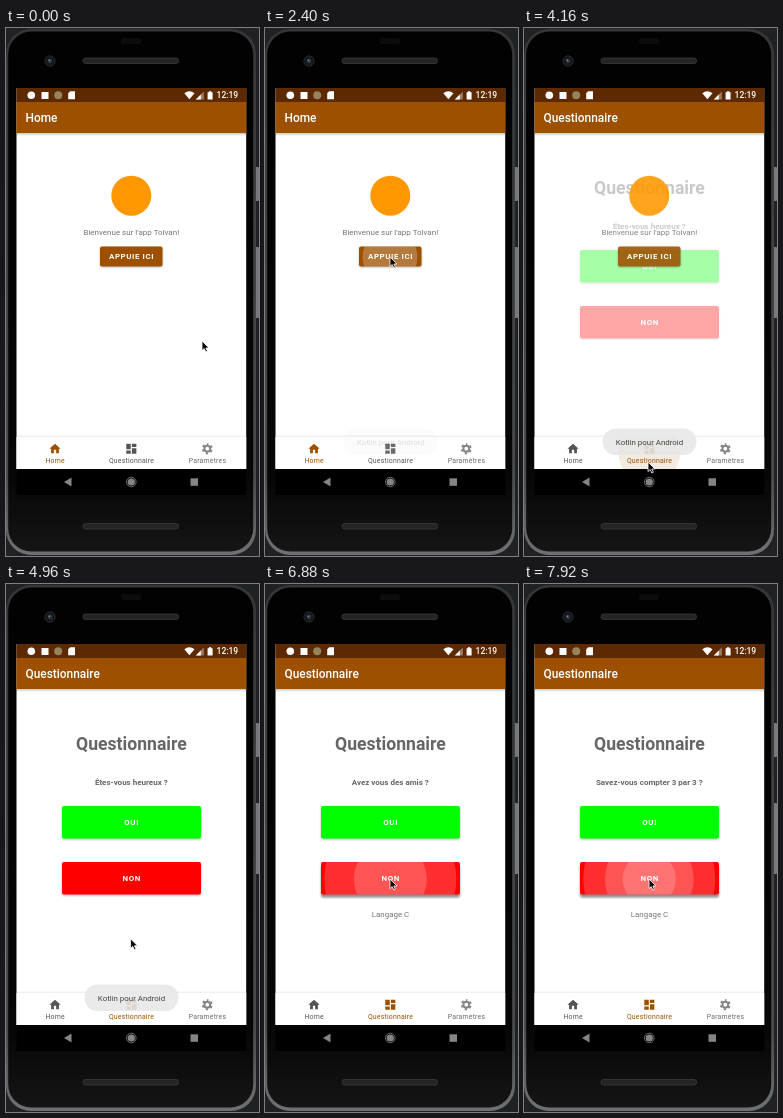
An HTML page that plays this animation: 253 by 528 pixels, repeating every 8000 ms.

```html
<!DOCTYPE html>
<html lang="fr">
<head>
<meta charset="utf-8">
<title>Application mobile</title>
<style>
html, body { margin: 0; width: 100%; height: 100%; overflow: hidden; background: #202124; }
svg { display: block; width: 100vw; height: 100vh; }
text { font-family: Roboto, "Noto Sans", sans-serif; font-size: 7.9px; fill: #757575; }
.mid { text-anchor: middle; }
.bar { font-size: 11.9px; font-weight: 500; fill: #fff; }
.btn { font-weight: 700; letter-spacing: .6px; fill: #fff; text-anchor: middle; }
.tab { font-size: 6.9px; letter-spacing: .2px; text-anchor: middle; fill: inherit; }
.bold { font-size: 8px; font-weight: 700; fill: #666; text-anchor: middle; }
</style>
</head>
<body>
<svg viewBox="0 0 253 528" preserveAspectRatio="none">
  <defs>
    <filter id="soft" x="-20%" y="-50%" width="140%" height="220%"><feGaussianBlur stdDeviation="1.1"/></filter>
    <clipPath id="startClip"><rect x="94" y="218.5" width="62.5" height="20" rx="2"/></clipPath>
    <clipPath id="noClip"><rect x="56" y="278" width="139" height="32.5" rx="2"/></clipPath>
    <clipPath id="tabClip"><rect x="10.5" y="409" width="229.7" height="32"/></clipPath>
    <linearGradient id="drop" x2="0" y2="1">
      <stop stop-opacity=".22"/><stop offset="1" stop-opacity="0"/>
    </linearGradient>
    <linearGradient id="rim" x2="0" y2="1">
      <stop stop-color="#353638"/><stop offset=".85" stop-color="#4a4b4d"/><stop offset="1" stop-color="#707173"/>
    </linearGradient>
    <linearGradient id="glass" x2="0" y2="1">
      <stop stop-color="#020202"/><stop offset=".85" stop-color="#060606"/><stop offset="1" stop-color="#151515"/>
    </linearGradient>
  </defs>

  <!-- Phone body -->
  <rect width="253" height="528" fill="#202124"/>
  <g fill="#77797b">
    <rect x="248" y="139" width="5" height="34" rx="1"/>
    <rect x="248" y="219" width="5" height="71" rx="1"/>
  </g>
  <rect y="1" width="250" height="526" rx="25" fill="url(#rim)"/>
  <rect x="2.2" y="3.5" width="245" height="520" rx="23" fill="url(#glass)"/>
  <rect x="115" y="10" width="20" height="6" rx="2" fill="#0c0c0d"/>
  <g fill="#242424" stroke="#3b3b3b" stroke-width=".8">
    <rect x="77" y="30" width="95.5" height="5.5" rx="2.5"/>
    <rect x="77" y="495.5" width="95.5" height="5.5" rx="2.5"/>
  </g>
  <circle cx="44" cy="33" r="5.2" fill="#15171a" stroke="#2b2d31" stroke-width=".8"/>
  <circle cx="44" cy="33" r="2.2" fill="#303a48"/>
  <circle cx="43.3" cy="32.3" r=".8" fill="#8793a5"/>

  <!-- Screen -->
  <rect x="10.5" y="60" width="229.7" height="381" fill="#fff"/>

  <g id="quiz">
    <text class="bold" x="125.4" y="166.3" style="font-size:17.6px">Questionnaire</text>
    <text class="bold" id="question" x="125.3" y="201"></text>
    <rect x="56" y="223" width="139" height="32.5" rx="2" opacity=".3" filter="url(#soft)"/>
    <rect x="56" y="222" width="139" height="32.5" rx="2" fill="#0f0"/>
    <text class="btn" x="125.7" y="241.2">OUI</text>
    <rect id="noShadow" x="56" width="139" height="32.5" rx="2" filter="url(#soft)"/>
    <rect x="56" y="278" width="139" height="32.5" rx="2" fill="#f00"/>
    <g id="noRipples" clip-path="url(#noClip)" fill="#fff"></g>
    <text class="btn" x="125.7" y="297.2">NON</text>
    <text class="mid" id="answer" x="125.5" y="333.2">Langage C</text>
  </g>

  <g id="home">
    <circle cx="125.3" cy="167.7" r="20" fill="#ff9800"/>
    <text class="mid" x="125.3" y="207.2" style="font-size:8px">Bienvenue sur l'app Tolvan!</text>
    <rect x="94" y="219.3" width="62.5" height="20" rx="2" opacity=".3" filter="url(#soft)"/>
    <rect x="94" y="218.5" width="62.5" height="20" rx="2" fill="#9c5000"/>
    <g id="startRipples" clip-path="url(#startClip)" fill="#fff"></g>
    <text class="btn" x="125.6" y="231.3">APPUIE ICI</text>
  </g>

  <rect x="10.5" y="105" width="229.7" height="3" fill="url(#drop)"/>
  <rect x="10.5" y="74" width="229.7" height="31" fill="#9c5000"/>
  <rect x="10.5" y="60" width="229.7" height="14" fill="#5d2900"/>
  <text class="bar" id="title" x="19.5" y="94"></text>

  <!-- Status bar -->
  <g fill="#fff">
    <circle cx="25.3" cy="67.3" r="3.8"/>
    <rect x="35.5" y="64" width="7" height="7"/>
    <circle cx="52.2" cy="67.3" r="4" fill="#97835e"/>
    <path d="M64.2 63.3H69V71.3H62.2V65.3Z"/>
    <path d="M178.3 65.2Q183.4 61.5 188.5 65.2L183.4 71.3Z"/>
    <path d="M189.8 71.4L197.8 63.4V71.4Z" opacity=".4"/>
    <path d="M189.8 71.4L194.8 66.4V71.4Z"/>
    <path d="M201.6 64.2h1.3v-1h2.4v1h1.3v7.3h-5z"/>
    <text x="210.6" y="70.4" style="font-size:8.5px;font-weight:500;fill:#fff">12:19</text>
  </g>

  <!-- Tabs -->
  <rect x="10.5" y="407.5" width="229.7" height="2" fill="#000" opacity=".06"/>
  <rect x="10.5" y="409" width="229.7" height="32" fill="#fff"/>
  <g id="tabRipples" clip-path="url(#tabClip)" fill="#9c5000"></g>
  <g id="tabHome">
    <path transform="translate(42.3 414) scale(.56)" d="M10 20v-6h4v6h5v-8h3L12 3 2 12h3v8z"/>
    <text class="tab" x="49.1" y="435">Home</text>
  </g>
  <g id="tabQuiz">
    <path transform="translate(118.6 414) scale(.56)" d="M3 13h8V3H3zM3 21h8v-6H3zM13 21h8V11h-8zM13 3v6h8V3z"/>
    <text class="tab" x="125.5" y="435">Questionnaire</text>
  </g>
  <g fill="#6c6c6c">
    <g transform="translate(201.3 420.7) scale(.56)" fill="none" stroke="#858585">
      <circle r="5.2" stroke-width="3.6"/>
      <circle r="8" stroke-width="3.6" stroke-dasharray="4 4.378" stroke-dashoffset="2" transform="rotate(-90)"/>
    </g>
    <text class="tab" x="201.5" y="435">Paramètres</text>
  </g>

  <!-- System navigation -->
  <rect x="10.5" y="441" width="229.7" height="26" fill="#000"/>
  <g fill="#858585">
    <path d="M58 454L65.5 449.6V458.4Z"/>
    <circle cx="125.3" cy="454" r="3.6"/>
    <circle cx="125.3" cy="454" r="4.8" fill="none" stroke="#777" stroke-width=".9"/>
    <rect x="184.5" y="450.3" width="7.5" height="7.5"/>
  </g>

  <g id="toast">
    <rect x="78.5" y="400.5" width="94" height="26.5" rx="13.2" fill="#e8e8e8" opacity=".88"/>
    <text class="mid" x="125.5" y="416.6" style="fill:#444">Kotlin pour Android</text>
  </g>

  <path id="cursor" d="M0 0V9.6L2.2 7.6L3.8 11L5.4 10.2L3.9 7H7Z" fill="#080808" stroke="#fff" stroke-width=".8"/>
</svg>
<script>
const LOOP = 8000;
const BROWN = "#9c5000", GREY = "#555";
const $ = id => document.getElementById(id);
const clamp = v => Math.max(0, Math.min(1, v));
const ramp = (t, from, to) => clamp((t - from) / (to - from));
const ease = p => p * p * (3 - 2 * p);

// Pointer path: time, x, y
const path = [
  [0, 196, 313], [320, 196, 313], [1280, 128, 391], [1440, 128, 391],
  [2080, 125, 229], [2480, 125, 229], [3200, 124, 429], [3500, 124, 429],
  [3760, 124, 434], [4480, 124, 434], [5360, 125, 295], [LOOP, 125, 295]
];
const questions = [
  [0, "Êtes-vous heureux ?"],
  [6080, "Avez vous des amis ?"],
  [6980, "Savez-vous compter 3 par 3 ?"]
];

function pointer(t) {
  const i = path.findIndex((p, k) => k && t <= p[0]);
  const [a, b] = [path[i - 1], path[i]];
  const p = ease(ramp(t, a[0], b[0]));
  return [a[1] + (b[1] - a[1]) * p, a[2] + (b[2] - a[2]) * p];
}

function makeRipples(id, x, y, starts, size, strength) {
  const rings = starts.map(start => {
    const el = document.createElementNS("http://www.w3.org/2000/svg", "circle");
    el.setAttribute("cx", x);
    el.setAttribute("cy", y);
    $(id).append(el);
    return { el, start };
  });
  return t => rings.forEach(({ el, start }) => {
    const age = t - start;
    el.setAttribute("r", size * (.28 + .72 * clamp(age / 240)));
    el.setAttribute("opacity", age < 0 ? 0 : strength * (1 - ramp(age, 280, 480)));
  });
}

const noPresses = [5890, 6640, 6790, 7660, 7790, 7880];
const ripples = [
  makeRipples("startRipples", 125, 229, [2240], 36, .24),
  makeRipples("tabRipples", 125.3, 425, [4010], 42, .12),
  makeRipples("noRipples", 125.3, 295, noPresses, 66, .18)
];

function draw(t) {
  const open = t >= 4080;
  const fade = ramp(t, 4040, 4390);
  $("title").textContent = open ? "Questionnaire" : "Home";
  $("home").setAttribute("opacity", 1 - fade * fade);
  $("quiz").setAttribute("opacity", fade);
  $("tabHome").setAttribute("fill", open ? GREY : BROWN);
  $("tabQuiz").setAttribute("fill", open ? BROWN : GREY);

  $("question").textContent = questions.filter(q => q[0] <= t).pop()[1];
  $("answer").setAttribute("opacity", t >= 6080 ? 1 : 0);
  const pressed = noPresses.some(s => t >= s && t < s + 300);
  $("noShadow").setAttribute("y", pressed ? 281 : 279);
  $("noShadow").setAttribute("opacity", pressed ? .45 : .3);

  $("toast").setAttribute("opacity", ramp(t, 2360, 2600) * (1 - ramp(t, 5950, 6320)));
  ripples.forEach(update => update(t));
  $("cursor").setAttribute("transform", `translate(${pointer(t)})`);
}

const begin = performance.now();
function tick() {
  draw((performance.now() - begin) % LOOP);
  requestAnimationFrame(tick);
}
tick();
</script>
</body>
</html>
```
